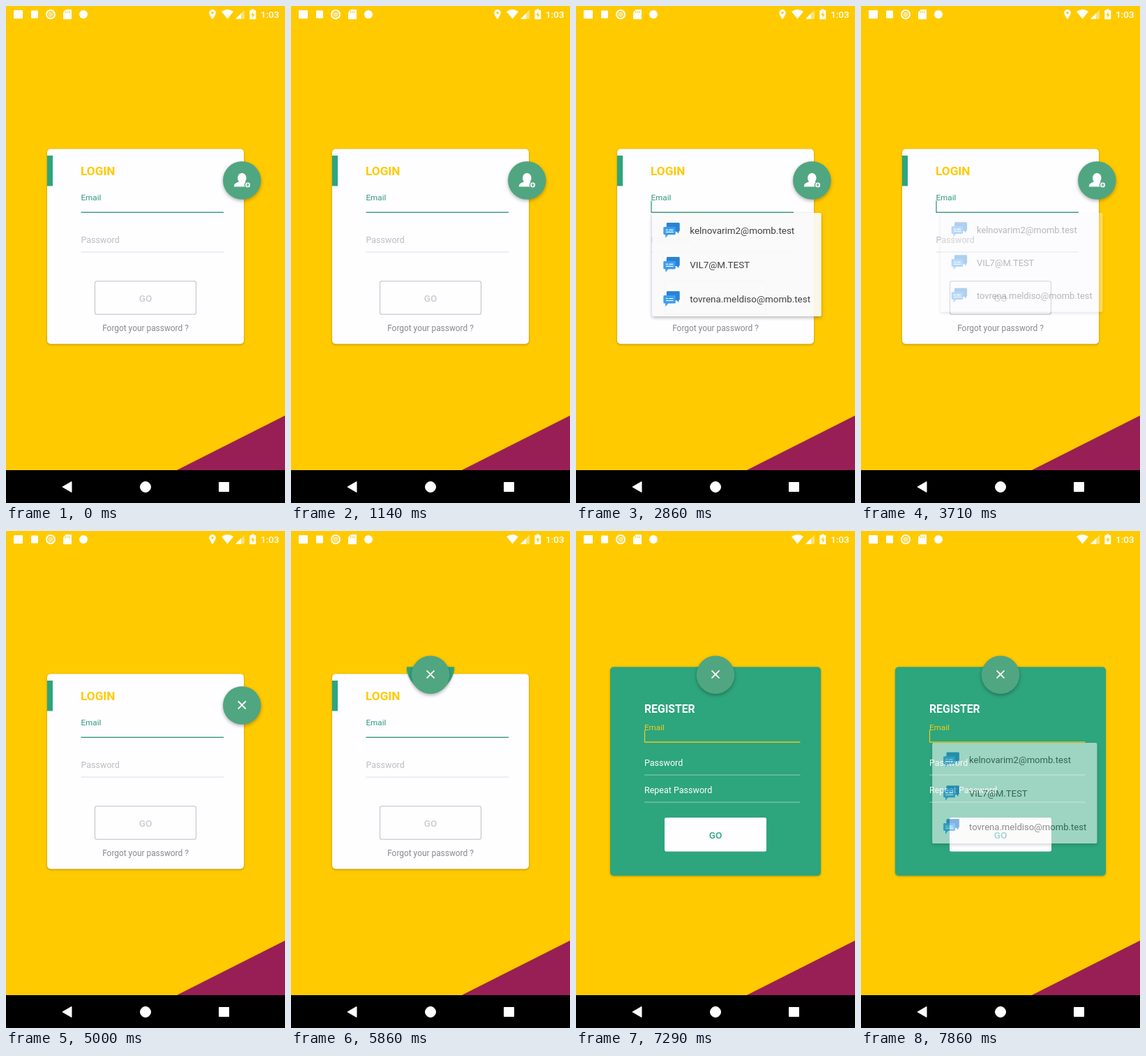
Recreate the animation shown at these times as an HTML page. Size 400 px wide and 711 px high, loop 8000 ms.

```html
<!DOCTYPE html>
<html lang="en">
<head>
<meta charset="utf-8">
<title>Login and register</title>
<style>
  html, body { margin: 0; height: 100%; overflow: hidden; background: #ffca00; }
  svg { display: block; width: 100vw; height: 100vh; font-family: Roboto, sans-serif; }
  .raised { filter: drop-shadow(0 1.5px 1.5px rgba(0, 0, 0, .3)); }
  .floating { filter: drop-shadow(0 2px 2.5px rgba(0, 0, 0, .3)); }
  .title { font-weight: 700; }
  .label { font-size: 11.67px; }
  .hint { font-size: 12.5px; }
  .go { font-size: 13.6px; font-weight: 500; text-anchor: middle; }
  .item { font-size: 13.5px; fill: #333; }
</style>
</head>
<body>
<svg viewBox="0 0 400 711" preserveAspectRatio="none">
  <defs>
    <clipPath id="reveal"><circle id="hole" cx="200" cy="194.5" r="0"/></clipPath>
    <g id="chat">
      <path d="M6 0h16q1.500 0 1.500 1.500v10q0 1.500-1.500 1.500v3l-3-3H6q-1.500 0-1.500-1.500v-10Q4.500 0 6 0z" fill="#1b7ad0"/>
      <path d="M1.500 6H16q1.500 0 1.500 1.500V16q0 1.500-1.500 1.500H7L3 22v-4.500H1.500Q0 17.500 0 16V7.500Q0 6 1.500 6z" fill="#2f97f0"/>
      <path d="M3.500 10.500h3m1.500 0h6M3.500 13.500h11" stroke="#fff" stroke-width="1.200"/>
    </g>
  </defs>

  <rect width="400" height="711" fill="#ffca00"/>
  <path class="raised" d="M245 664L400 586V664z" fill="#981f55"/>

  <g fill="#fff">
    <rect x="11" y="6" width="13" height="12" rx="1"/>
    <rect x="36" y="6.500" width="10" height="11" rx="1"/>
    <circle cx="64" cy="12" r="7"/>
    <circle cx="64" cy="12" r="4.300" fill="#ffe58a" stroke="#ffca00" stroke-width="1.200"/>
    <path d="M86 5h7q1 0 1 1v12q0 1-1 1H83q-1 0-1-1V9z"/>
    <path d="M85.500 7.500v2.500m2.500-2.500v2.500m2.500-2.500v2.500" stroke="#ffca00"/>
    <circle cx="111" cy="12" r="6"/>
    <path id="pin" fill-rule="evenodd" d="M296 5a4.800 4.800 0 0 1 4.800 4.800C300.800 13 296 19 296 19s-4.800-6-4.800-9.200A4.800 4.800 0 0 1 296 5zm0 3a1.700 1.700 0 1 0 .01 0z"/>
    <path d="M317.500 18.500L309 8q8.500-6 17 0z"/>
    <path d="M342 5.500v13h-13z" opacity=".45"/>
    <path d="M337 10.500v8h-8z"/>
    <path d="M352 4.500h3.500V6h2q.8 0 .8.800v11.400q0 .8-.8.800h-7.400q-.8 0-.8-.8V6.800q0-.8.8-.8H352z"/>
    <path d="M354.500 8l-3 5h2v4l3-5h-2z" fill="#ffca00"/>
    <text x="365" y="17" font-size="13.600" font-weight="500">1:03</text>
  </g>

  <rect y="664" width="400" height="47"/>
  <g fill="#fff" stroke="#fff" stroke-linejoin="round">
    <path d="M81 688l13-7.500v15z"/>
    <circle cx="200" cy="688" r="7.500"/>
    <rect x="305.500" y="681.500" width="14" height="13"/>
  </g>

  <g>
    <rect class="raised" x="59" y="204.500" width="282" height="279" rx="5" fill="#fefdff"/>
    <rect x="59" y="214" width="8" height="43.500" fill="#2da57d"/>
    <text class="title" x="107" y="242" font-size="17.200" fill="#ffca00">LOGIN</text>
    <text class="label" x="107.500" y="278" fill="#2f9a77">Email</text>
    <path d="M107.500 295.200H312" stroke="#43a082" stroke-width="1.500"/>
    <text class="hint" x="107.500" y="339" fill="#bdbdbd">Password</text>
    <path d="M107.500 352H312" stroke="#dedede"/>
    <rect x="127.500" y="393.700" width="145" height="47.500" rx="3" fill="none" stroke="#ccc" stroke-width="1.300"/>
    <text class="go" x="200" y="423" fill="#cbcbcb">GO</text>
    <text x="200" y="465" font-size="11.900" text-anchor="middle" fill="#888">Forgot your password ?</text>
    <path id="loginCaret" d="M108 278.500V295" stroke="#43a082" stroke-width="1.400"/>
  </g>

  <g id="register" class="raised">
    <g clip-path="url(#reveal)">
      <rect x="49" y="194.500" width="302" height="298.500" rx="5" fill="#2da57d"/>
      <text class="title" x="98" y="260" font-size="15.750" fill="#fff">REGISTER</text>
      <text class="label" x="98" y="285" fill="#f0cb1c">Email</text>
      <path d="M98 302H321.500" stroke="#e8c820" stroke-width="1.300"/>
      <text class="hint" x="98" y="336" fill="#fff">Password</text>
      <text class="hint" x="98" y="375" fill="#fff">Repeat Password</text>
      <path d="M98 349H321.500M98 388H321.500" stroke="#8fcfb9"/>
      <rect x="127" y="410" width="146" height="48.500" rx="2.500" fill="#fefdff"/>
      <text class="go" x="200" y="440" fill="#2da57d">GO</text>
      <path id="registerCaret" d="M98.500 284.500V302" stroke="#e8c820" stroke-width="1.300"/>
    </g>
  </g>

  <g id="fab" class="floating">
    <circle r="27.300" fill="#50a681"/>
    <g id="person" fill="#fff">
      <ellipse cy="-3.500" rx="6.300" ry="7"/>
      <path d="M-11.500 9c0-6.500 6.500-5.500 8.500-8.500h6c2 3 8.500 2 8.500 8.500z"/>
      <circle cx="8.300" cy="6.500" r="4.200" stroke="#50a681" stroke-width="1.300"/>
      <path d="M8.300 4.300v4.400M6.100 6.500h4.400" stroke="#50a681" stroke-width="1.200"/>
    </g>
    <path id="cross" d="M-5.500-6L5.500 5M5.500-6L-5.500 5" stroke="#fff" stroke-width="1.800"/>
  </g>

  <g id="popup">
    <rect class="floating" width="244" height="148.700" rx="2" fill="#fafafa"/>
  </g>
</svg>
<script>
const LOOP = 8000, FPS = 7;
const $ = id => document.getElementById(id);
const clamp = v => Math.min(1, Math.max(0, v));
const ramp = (t, start, length) => clamp((t - start) / length);
const show = (id, on) => $(id).setAttribute('display', on ? 'inline' : 'none');
const bezier = (a, b, c, d, p) => {
  const q = 1 - p;
  return q * q * q * a + 3 * q * q * p * b + 3 * q * p * p * c + p * p * p * d;
};

['kelnovarim2@momb.test', 'VIL7@M.TEST', 'tovrena.meldiso@momb.test'].forEach((mail, i) => {
  const y = 49.3 * i;
  $('popup').insertAdjacentHTML('beforeend',
    `<use href="#chat" x="16.5" y="${y + 14}"/><text class="item" x="54.6" y="${y + 30.3}">${mail}</text>`);
});

function drawFab(t) {
  // The button stalls on its arc until the register screen is ready.
  const u = ramp(Math.min(t, 5430), 5000, 612);
  const p = t > 5700 ? 1 : u * u * (3 - 2 * u);
  const x = bezier(338.3, 300, 231, 200, p);
  const y = bezier(249.5, 249.5, 227, 205.7, p);
  $('fab').setAttribute('transform', `translate(${x} ${y})`);
  show('person', t < 4990);
  show('cross', t >= 4990);
}

function drawPopup(t) {
  const onLogin = t < 5000;
  const alpha = onLogin ? ramp(t, 2648, 225) - ramp(t, 3450, 400) : ramp(t, 7733, 225);
  const scale = 0.93 + 0.07 * alpha;
  const x = (onLogin ? 108.3 : 98.3) + 122 * (1 - scale);
  $('popup').setAttribute('transform', `translate(${x} ${onLogin ? 296 : 303}) scale(${scale})`);
  $('popup').setAttribute('opacity', alpha);
}

function draw(t) {
  drawFab(t);
  drawPopup(t);
  show('pin', t < 5280);
  show('loginCaret', t > 2420 && t < 3850);
  show('registerCaret', t > 7280);
  show('register', t > 5800);
  $('hole').setAttribute('r', t > 6400 ? 500 : 27 + 278 * ramp(t, 5803, 337) ** 2);
}

function tick() {
  const t = performance.now() % LOOP;
  // The screen refreshes in hard steps.
  draw(Math.floor(t * FPS / 1000 + 0.03) * 1000 / FPS);
  requestAnimationFrame(tick);
}
tick();
</script>
</body>
</html>
```
